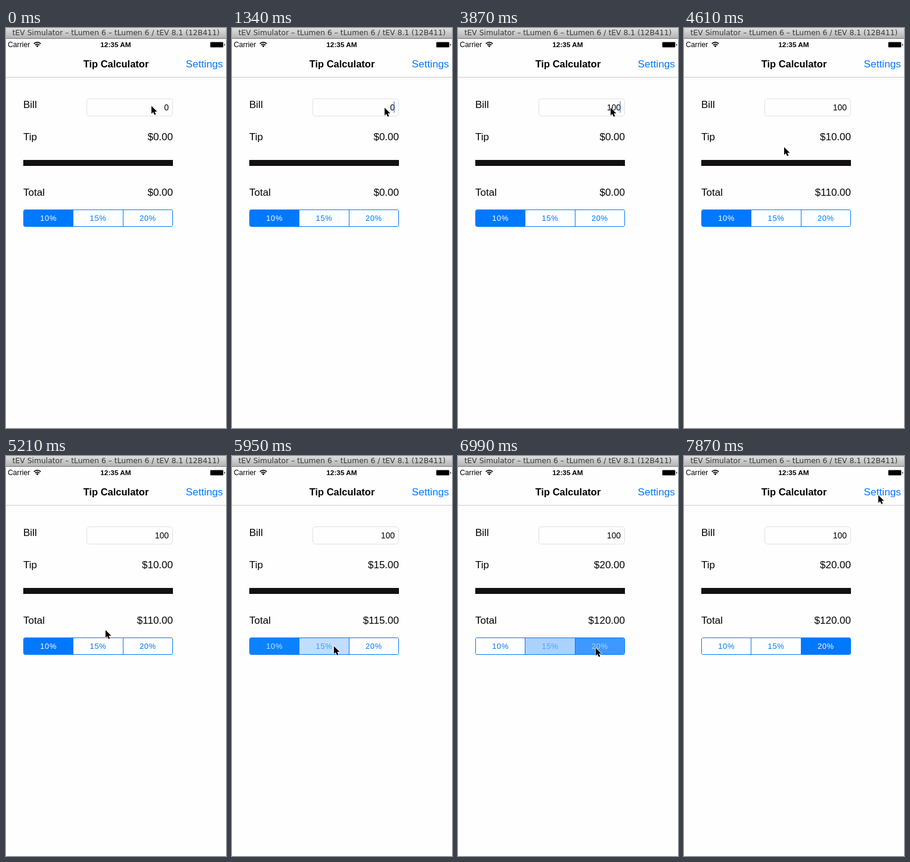
Recreate the animation shown at these times as an HTML page. Size 369 px wide and 670 px high, loop 8000 ms.

```html
<!DOCTYPE html>
<html lang="en">
<head>
<meta charset="utf-8">
<title>Tip Calculator</title>
<style>
  :root { --blue: #0078ff; }
  html, body { margin: 0; width: 100%; height: 100%; overflow: hidden; background: #fefefe; }
  .stage {
    position: relative; width: 369px; height: 670px; overflow: hidden;
    font: 17px/20px "Liberation Sans", Arial, sans-serif; color: #000; white-space: nowrap;
  }
  .stage > * { position: absolute; }

  .window {
    left: 0; top: 0; width: 369px; height: 17px; border-bottom: 1px solid #747474;
    background: linear-gradient(#dedede, #b5b5b5);
    font: 12.35px/16px "DejaVu Sans", sans-serif; color: #383838;
  }
  .window span { position: absolute; left: 0; right: 0; top: 0; text-align: center; }

  .carrier { left: 3px; top: 18px; font-size: 12.2px; }
  .clock { left: 0; width: 368px; top: 18px; text-align: center; font-size: 11.8px; font-weight: bold; }
  .wifi { left: 46px; top: 22px; }
  .battery { left: 342px; top: 23px; }
  .title { left: 0; width: 369px; top: 50px; text-align: center; font-size: 16.5px; font-weight: bold; }
  .settings { right: 5px; top: 50px; font-size: 17.3px; color: var(--blue); }
  .rule { left: 0; top: 82px; width: 369px; height: 1px; background: #c9c9c9; }

  .label { left: 29px; }
  .field {
    left: 135px; top: 118px; width: 143px; height: 28px;
    border: 1px solid #e0e0e0; border-radius: 5px; background: #fefefe;
  }
  .bar { left: 29px; top: 221px; width: 251px; height: 10px; background: #131112; }

  /* one visible line of a vertical strip of values */
  .reel { right: 89px; width: 120px; height: 20px; overflow: hidden; text-align: right; }
  .reel div div { height: 20px; }
  .bill { right: 96px; top: 123px; font-size: 14px; }
  .caret { left: 271px; top: 123px; width: 2px; height: 19px; background: #426bd8; }

  .segments {
    left: 29px; top: 304px; width: 249px; height: 27px; display: flex;
    border: 1px solid var(--blue); border-radius: 3px; overflow: hidden;
    font-size: 13px; line-height: 27px; letter-spacing: .6px; text-align: center;
  }
  .segments span { flex: 1; color: var(--blue); }
  .segments span + span { border-left: 1px solid var(--blue); }

  .anim { animation: 8s step-end -2ms infinite; }
  .bill .anim { animation-name: bill; }
  .amount .anim { animation-name: amount; }
  .caret { animation-name: caret; }
  .ten { animation-name: ten; }
  .fifteen { animation-name: fifteen; }
  .twenty { animation-name: twenty; }
  .pointer { left: 0; top: 0; animation-name: pointer; }

  @keyframes bill {
    0% { transform: none; }
    22.25% { transform: translateY(-20px); }
    29.625% { transform: translateY(-40px); }
    33.375% { transform: translateY(-60px); }
    40.875%, 100% { transform: translateY(-80px); }
  }
  @keyframes amount {
    0% { transform: none; }
    57.625% { transform: translateY(-20px); }
    74.375% { transform: translateY(-40px); }
    87.375%, 100% { transform: translateY(-60px); }
  }
  @keyframes caret {
    0% { opacity: 0; }
    11.125% { opacity: 1; }
    16.75% { opacity: .55; }
    18.625% { opacity: 0; }
    20.5% { opacity: .5; }
    22.25% { opacity: 1; }
    48.375% { opacity: .55; }
    50.25% { opacity: 0; }
    53.875% { opacity: .5; }
    55.75% { opacity: 1; }
    57.625%, 100% { opacity: 0; }
  }
  @keyframes ten {
    0% { background: var(--blue); color: #fff; }
    74.375% { background: #0a82ff; color: #cbe4ff; }
    76.25% { background: #a8d0ff; color: #4ba0fa; }
    78.125%, 100% { background: #fefefe; color: var(--blue); }
  }
  @keyframes fifteen {
    0% { background: #fefefe; color: var(--blue); }
    74.375% { background: #c0deff; color: #3c9cfa; }
    76.25% { background: #3d9bff; color: #acd4ff; }
    78.125% { background: var(--blue); color: #fff; }
    87.375% { background: #abd2ff; color: #4ba0fa; }
    89.25%, 100% { background: #fefefe; color: var(--blue); }
  }
  @keyframes twenty {
    0% { background: #fefefe; color: var(--blue); }
    87.375% { background: #3d99ff; color: #acd4ff; }
    89.25%, 100% { background: var(--blue); color: #fff; }
  }
  @keyframes pointer {
    0% { transform: translate(243px, 129px); }
    1.875% { transform: translate(251px, 132px); }
    3.625% { transform: translate(255px, 132px); }
    50.25% { transform: translate(250px, 138px); }
    52.125% { transform: translate(220px, 165px); }
    53.875% { transform: translate(180px, 192px); }
    55.75% { transform: translate(167px, 198px); }
    61.375% { transform: translate(165px, 224px); }
    63.25% { transform: translate(164px, 262px); }
    65.125% { transform: translate(166px, 290px); }
    67% { transform: translate(168px, 308px); }
    68.75% { transform: translate(170px, 317px); }
    78.125% { transform: translate(178px, 318px); }
    80% { transform: translate(212px, 319px); }
    81.75% { transform: translate(230px, 320px); }
    92.875% { transform: translate(237px, 298px); }
    94.75% { transform: translate(275px, 190px); }
    96.625% { transform: translate(316px, 92px); }
    98.375%, 100% { transform: translate(325px, 64px); }
  }
</style>
</head>
<body>
<div class="stage">
  <div class="window"><span>tEV Simulator – tLumen 6 – tLumen 6 / tEV 8.1 (12B411)</span></div>

  <span class="carrier">Carrier</span>
  <svg class="wifi" width="13" height="11" fill="none" stroke="#000" stroke-width="1.7">
    <path d="M.8 4.3a8 8 0 0 1 11.4 0M2.9 6.6a5 5 0 0 1 7.2 0"/>
    <path d="M6.5 10.2 4.4 8.1a3 3 0 0 1 4.2 0z" fill="#000" stroke="none"/>
  </svg>
  <span class="clock">12:35 AM</span>
  <svg class="battery" width="26" height="11">
    <rect x=".5" y=".5" width="22" height="9" rx="1.5" fill="none" stroke="#999"/>
    <rect x="1" y="1" width="21" height="8" rx=".8"/>
    <path d="M24 3.2v3.6q1.3-.4 1.3-1.8T24 3.2z"/>
  </svg>

  <span class="title">Tip Calculator</span>
  <span class="settings">Settings</span>
  <div class="rule"></div>

  <span class="label" style="top:119px">Bill</span>
  <div class="field"></div>
  <div class="reel bill"><div class="anim">
    <div>0</div><div></div><div>1</div><div>10</div><div>100</div>
  </div></div>
  <div class="caret anim"></div>

  <span class="label" style="top:173px">Tip</span>
  <div class="reel amount" style="top:173px"><div class="anim">
    <div>$0.00</div><div>$10.00</div><div>$15.00</div><div>$20.00</div>
  </div></div>

  <div class="bar"></div>

  <span class="label" style="top:266px">Total</span>
  <div class="reel amount" style="top:266px"><div class="anim">
    <div>$0.00</div><div>$110.00</div><div>$115.00</div><div>$120.00</div>
  </div></div>

  <div class="segments">
    <span class="anim ten">10%</span><span class="anim fifteen">15%</span><span class="anim twenty">20%</span>
  </div>

  <svg class="pointer anim" width="15" height="20" viewBox="0 0 16 21.33">
    <path d="M1.5 3v14l3.3-3 2.4 5 2.6-1.2-2.2-4.8h4.6z" fill="#000" opacity=".2"/>
    <path d="M1 1.6v13.8l3.1-2.9 2.3 5.2 2.6-1.1-2.3-5h4.4z" stroke="#fff" stroke-width="1.6" paint-order="stroke" stroke-linejoin="round"/>
  </svg>
</div>
</body>
</html>
```
